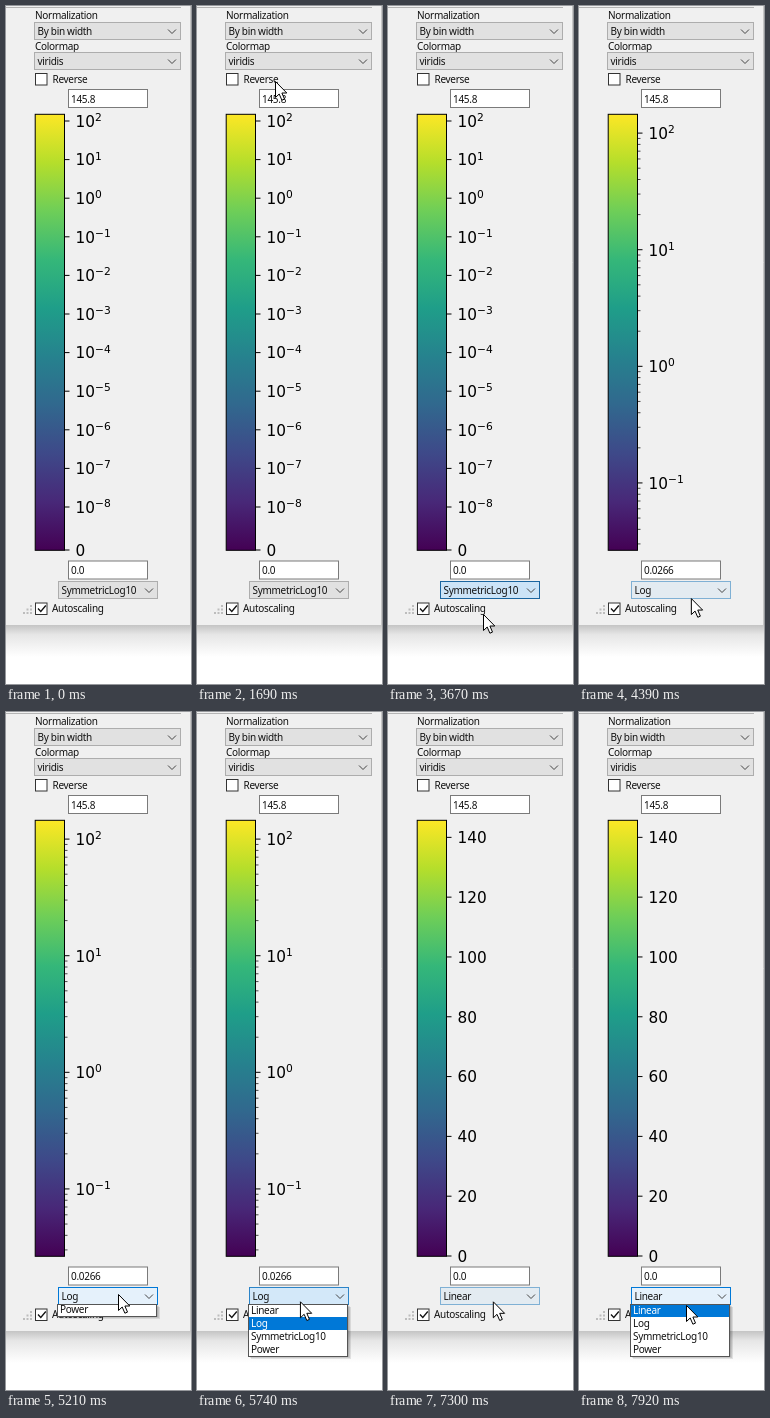
Recreate the animation shown at these times as an HTML page. Size 185 by 678 pixels, loop 8 s.

```html
<!DOCTYPE html>
<html lang="en">
<head>
<meta charset="utf-8">
<title>Colorbar scaling</title>
<style>
  html, body { margin: 0; width: 100%; height: 100%; overflow: hidden; background: #fff; }
  #stage { display: block; width: 185px; height: 678px; }
  text { font: 10px "Noto Sans", sans-serif; letter-spacing: -.3px; fill: #111; white-space: pre; }
  .tick text { font: 15.3px "DejaVu Sans", sans-serif; letter-spacing: 0; fill: #000; }
  .tick .power { font-size: 10.7px; }
</style>
</head>
<body>
<svg id="stage" viewBox="0 0 185 678">
  <defs>
    <linearGradient id="viridis" x1="0" y1="1" x2="0" y2="0"></linearGradient>
    <linearGradient id="shade" x1="0" y1="0" x2="0" y2="1">
      <stop offset="0" stop-color="#c4c4c4"/>
      <stop offset=".3" stop-color="#e6e6e6"/>
      <stop offset="1" stop-color="#fff"/>
    </linearGradient>
  </defs>
</svg>
<script>
const LOOP = 8000, STEP = 89;
const stage = document.getElementById('stage');

function add(parent, tag, attrs = {}, text) {
  const node = document.createElementNS('http://www.w3.org/2000/svg', tag);
  set(node, attrs);
  if (text !== undefined) node.textContent = text;
  return parent.appendChild(node);
}
function set(node, attrs) {
  for (const key in attrs) node.setAttribute(key, attrs[key]);
}
const rect = (parent, x, y, width, height, fill, stroke = 'none') =>
  add(parent, 'rect', { x, y, width, height, fill, stroke });
const label = (x, y, text, parent = stage) => add(parent, 'text', { x, y }, text);
const line = (parent, d, stroke, width = 1) =>
  add(parent, 'path', { d, stroke, fill: 'none', 'stroke-width': width });

function combo(x, y, width, text) {
  const box = rect(stage, x, y, width, 17, '#e1e1e1', '#adadad');
  line(stage, `M${x + width - 12.5} ${y + 7}l4 4 4-4`, '#444');
  return { box, caption: label(x + 3, y + 12.3, text) };
}
function field(y, text) {
  rect(stage, 62.5, y, 79, 18, '#fff', '#7a7a7a');
  return label(65, y + 13.2, text);
}
function checkbox(y, x, text) {
  rect(stage, 29.5, y, 11.5, 11.5, '#fff', '#333');
  label(x, y + 9.3, text);
}

// Window
rect(stage, 0, 619, 185, 32, 'url(#shade)');
rect(stage, 0, 0, 185, 619, '#f0f0f0');
line(stage, 'M0 1.5H175', '#b4b4b4');
line(stage, 'M184.5 0V619', '#c6c6c6');
label(29, 13.3, 'Normalization');
combo(28.5, 16.5, 146, 'By bin width');
label(29, 43.8, 'Colormap');
combo(28.5, 46.5, 146, 'viridis');
checkbox(67.5, 46.5, 'Reverse');
field(83.5, '145.8');
const minimum = field(555, '0.0');
const scaleCombo = combo(52.5, 575.5, 99, '');
checkbox(597, 46, 'Autoscaling');
line(stage, 'M29.5 603M32 602.5l2.8 3 5-6', '#111', 1.3);
for (let i = 0; i < 3; i++)
  for (let j = 0; j <= i; j++) rect(stage, 24 - 3.5 * j, 599 + 3.5 * i, 2, 2, '#bdbdbd');

// Color bar
const TOP = 108, BOTTOM = 544, MAX = 145.8, MIN = 0.0266;
const palette = '440154 482878 3e4989 31688e 26828e 1f9e89 35b779 6ece58 b5de2b fde725'.split(' ');
palette.forEach((color, i) => add(document.getElementById('viridis'), 'stop',
  { offset: i / (palette.length - 1), 'stop-color': '#' + color }));
rect(stage, 29.2, TOP + .3, 29.3, BOTTOM - TOP, 'url(#viridis)', '#000');

function tick(group, y, text, power) {
  line(group, `M58.5 ${y}h5`, '#000');
  const caption = add(group, 'text', { x: 69.5, y: y + 5.8 }, text);
  if (power !== undefined)
    add(caption, 'tspan', { class: 'power', dy: -5.9 }, String(power).replace('-', '\u2212'));
}
const axis = {};
for (const name of ['SymmetricLog10', 'Log', 'Linear'])
  axis[name] = add(stage, 'g', { class: 'tick' });

for (let p = 2; p >= -8; p--) tick(axis.SymmetricLog10, 115 + (2 - p) * 38.6, '10', p);
tick(axis.SymmetricLog10, BOTTOM, '0');

const logY = v => TOP + (BOTTOM - TOP) * Math.log(MAX / v) / Math.log(MAX / MIN);
for (let p = -2; p <= 2; p++)
  for (let m = 1; m < 10; m++) {
    const value = m * 10 ** p;
    if (value < MIN || value > MAX) continue;
    if (m === 1) tick(axis.Log, logY(value), '10', p);
    else line(axis.Log, `M58.5 ${logY(value)}h3`, '#000', .7);
  }

for (let v = 0; v <= 140; v += 20)
  tick(axis.Linear, BOTTOM - (BOTTOM - TOP) * v / MAX, v);

// Drop-down list
const ROW = 13, LIST = 52;
const popup = add(stage, 'g');
const shadows = [3, 2, 1].map(d => {
  const node = rect(popup, 51 + d, 592 + d, 100, LIST, '#000');
  set(node, { opacity: .1 });
  return node;
});
const view = add(popup, 'svg', { x: 51, y: 592, width: 100, overflow: 'hidden' });
rect(view, 0, 0, 100, LIST, '#fff');
const list = add(view, 'g');
const rows = ['Linear', 'Log', 'SymmetricLog10', 'Power'].map((name, i) => ({
  back: rect(list, 1, i * ROW, 98, ROW, '#fff'),
  text: label(3, i * ROW + 10, name, list)
}));
const frame = rect(popup, 51.5, 592.5, 99, LIST, 'none', '#555');

const cursor = add(stage, 'path', {
  d: 'M.5 .5V16.5L4.2 13 6.9 19.2 9.5 18.1 6.9 12H11.8Z',
  fill: '#fff', stroke: '#000', 'stroke-width': 1
});

// Combo looks: fill, border
const looks = {
  idle: ['#e1e1e1', '#adadad'],
  fading: ['#e3ebf1', '#7fb0d4'],
  hover: ['#e5f1fb', '#0078d7'],
  open: ['#d3e8f9', '#2b84c8'],
  pressed: ['#cce4f7', '#1a659f']
};
// time, list height, active row, combo look, scale
const states = [
  [0, 0, 2, 'idle', 'SymmetricLog10'],
  [2210, 0, 2, 'hover', 'SymmetricLog10'],
  [2490, 12, 2, 'pressed', 'SymmetricLog10'],
  [2580, 32, 2, 'hover', 'SymmetricLog10'],
  [2660, 46, 2, 'hover', 'SymmetricLog10'],
  [2750, LIST, 2, 'open', 'SymmetricLog10'],
  [2920, LIST, 0, 'pressed', 'SymmetricLog10'],
  [3120, LIST, 1, 'pressed', 'SymmetricLog10'],
  [3670, 0, 1, 'pressed', 'SymmetricLog10'],
  [3860, 0, 1, 'open', 'Log'],
  [3950, 0, 1, 'idle', 'Log'],
  [4390, 0, 1, 'fading', 'Log'],
  [4490, 0, 1, 'hover', 'Log'],
  [5210, 12, 1, 'hover', 'Log'],
  [5290, 32, 1, 'hover', 'Log'],
  [5380, LIST, 1, 'hover', 'Log'],
  [5560, LIST, 1, 'open', 'Log'],
  [5830, LIST, 0, 'pressed', 'Log'],
  [6570, 0, 0, 'pressed', 'Log'],
  [6850, 0, 0, 'open', 'Linear'],
  [6950, 0, 0, 'idle', 'Linear'],
  [7290, 0, 0, 'fading', 'Linear'],
  [7380, 0, 0, 'hover', 'Linear'],
  [7650, 32, 0, 'hover', 'Linear'],
  [7750, LIST, 0, 'hover', 'Linear']
];
// start, steps, control point, end point; each move begins where the last ended
const moves = [
  [1420, 4, [51, 32], [78, 75]],
  [1860, 5, [215, 450], [111, 587]],
  [2920, 3, [102, 598], [95, 608]],
  [4040, 9, [118.5, 592], [112, 582]],
  [5560, 7, [100.6, 589], [93, 603]],
  [7110, 4, [102, 592], [108, 586]],
  [7920, 1, [107, 590], [107, 593]]
];

function cursorAt(t) {
  let from = [24, -10];
  for (const [start, steps, control, end] of moves) {
    if (t < start) break;
    const u = Math.min(1, (Math.floor((t - start + 10) / STEP) + 1) / steps);
    const v = 1 - u;
    from = from.map((a, i) => v * v * a + 2 * u * v * control[i] + u * u * end[i]);
  }
  return from;
}

function draw(now) {
  const t = now % LOOP;
  const [, height, active, look, scale] = states.findLast(s => s[0] <= t);

  for (const name in axis) set(axis[name], { display: name === scale ? 'inline' : 'none' });
  minimum.textContent = scale === 'Log' ? '0.0266' : '0.0';
  scaleCombo.caption.textContent = scale;
  const [fill, stroke] = looks[look];
  set(scaleCombo.box, { fill, stroke });

  set(popup, { display: height ? 'inline' : 'none' });
  if (height) {
    set(view, { height });
    set(frame, { height });
    shadows.forEach(s => set(s, { height }));
    set(list, { transform: `translate(0 ${height - LIST})` });
    const settled = height === LIST;
    rows.forEach(({ back, text }, i) => {
      const on = i === active;
      set(back, { fill: !on ? '#fff' : settled ? '#0078d7' : '#f0f0f0' });
      text.style.fill = on && settled ? '#fff' : '#111';
    });
  }

  const [x, y] = cursorAt(t);
  set(cursor, { display: t < moves[0][0] ? 'none' : 'inline', transform: `translate(${x} ${y})` });
}

const begin = performance.now();
function tickFrame() {
  draw(performance.now() - begin);
  requestAnimationFrame(tickFrame);
}
tickFrame();
</script>
</body>
</html>
```
